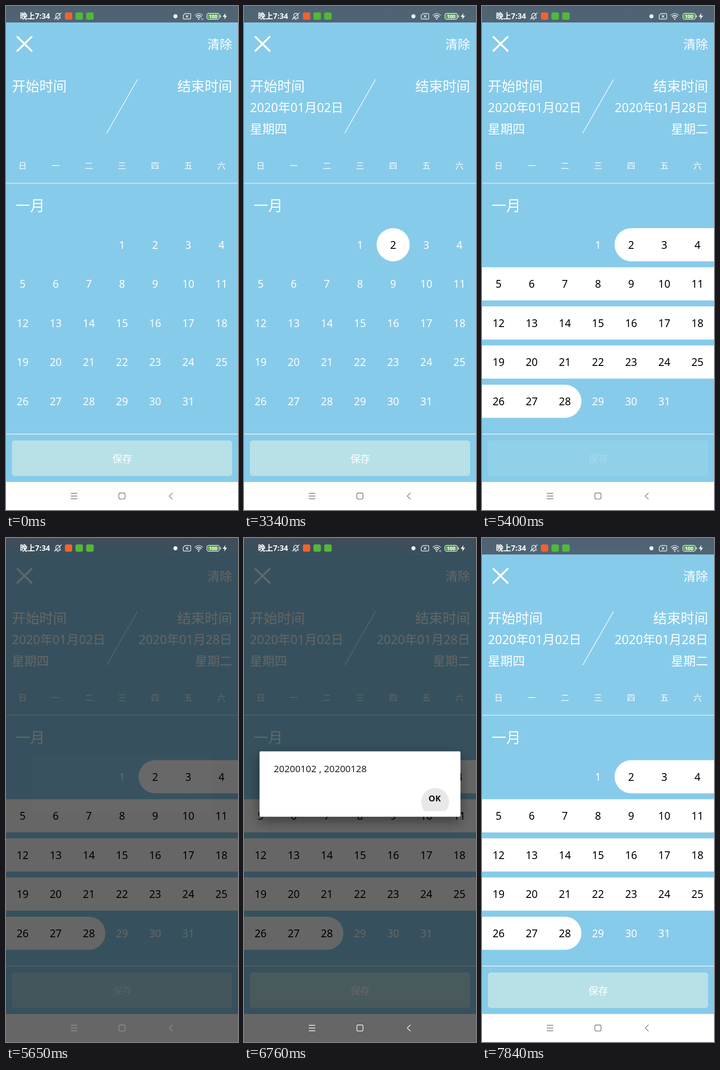
An HTML page with a canvas that plays this animation: 508 by 1102 pixels, repeating every 8 s.

```html
<!DOCTYPE html>
<html lang="zh-CN">
<head>
<meta charset="utf-8">
<title>日期选择</title>
<style>
html, body { margin: 0; width: 100%; height: 100%; overflow: hidden; background: #87cbea; }
canvas { display: block; width: 508px; height: 1102px; }
</style>
</head>
<body>
<canvas id="stage" width="508" height="1102"></canvas>
<script>
const W = 508, H = 1102, LOOP = 8000;
const SKY = '#87cbea', WHITE = '#fff';
const FONT = '"Noto Sans", "Noto Sans CJK SC", "Noto Sans CJK", sans-serif';
const CELL = W / 7, ROW = 85.55, PILL = 72.5, TOP = 485.7;
const ctx = document.getElementById('stage').getContext('2d');

const clamp = v => Math.max(0, Math.min(1, v));
const ramp = (t, a, b) => clamp((t - a) / (b - a));
const easeOut = p => 1 - (1 - p) ** 2;
const mix = (a, b, p) => a + (b - a) * p;

function text(str, x, y, size, { color = WHITE, align = 'left', weight = 400 } = {}) {
  ctx.font = `${weight} ${size}px ${FONT}`;
  ctx.textAlign = align;
  ctx.fillStyle = color;
  ctx.fillText(str, x, y);
}

function box(x, y, w, h, r, color) {
  ctx.beginPath();
  ctx.roundRect(x, y, w, h, r);
  ctx.fillStyle = color;
  ctx.fill();
}

function disc(x, y, r, color) {
  ctx.beginPath();
  ctx.arc(x, y, r, 0, Math.PI * 2);
  ctx.fillStyle = color;
  ctx.fill();
}

function stroke(path, width, color = WHITE, cap = 'butt') {
  ctx.lineWidth = width;
  ctx.strokeStyle = color;
  ctx.lineCap = cap;
  ctx.lineJoin = 'round';
  ctx.stroke(new Path2D(path));
}

function drawHeader(start, end) {
  stroke('M25 67.5L56 98M56 67.5L25 98', 4, WHITE, 'round');
  text('清除', 495, 93.5, 27, { align: 'right' });
  text('开始时间', 13, 186, 30);
  text('结束时间', 495, 186, 30, { align: 'right' });
  stroke('M288 160.5L220.5 278', 1.5);
  if (start) {
    text('2020年01月02日', 13, 232, 27);
    text('星期四', 13, 279, 27);
  }
  if (end) {
    text('2020年01月28日', 495, 232, 27, { align: 'right' });
    text('星期二', 495, 279, 27, { align: 'right' });
  }
  [...'日一二三四五六'].forEach((d, i) =>
    text(d, CELL * (i + 0.5), 356, 18, { align: 'center' }));
  box(0, 386.8, W, 1.4, 0, '#ece9e6');
}

function drawMonth(first, last) {
  text('一月', 21, 448, 32);
  const offset = 2;
  for (let r = 0; r < 5 && first; r++) {
    const a = Math.max(first + offset, r * 7), b = Math.min(last + offset, r * 7 + 6);
    if (a > b) continue;
    const left = a === first + offset ? (a % 7) * CELL : -40;
    const right = b === last + offset ? (b % 7 + 1) * CELL : W + 40;
    box(left, TOP + r * ROW, right - left, PILL, PILL / 2, WHITE);
  }
  for (let d = 1; d <= 31; d++) {
    const i = d + offset, on = d >= first && d <= last;
    text(d, (i % 7 + 0.5) * CELL, 530.5 + Math.floor(i / 7) * ROW, 23,
      { align: 'center', color: on ? '#000' : WHITE });
  }
}

function drawFooter(opacity) {
  box(0, 935.3, W, 1.5, 0, '#f2f5f5');
  ctx.globalAlpha = opacity;
  box(13, 950, 482, 77.5, 6, '#b8e1e7');
  text('保存', 254.5, 998, 21.6, { align: 'center' });
  ctx.globalAlpha = 1;
  box(0, 1040.5, W, H - 1040.5, 0, WHITE);
  box(0, 1040, W, 1, 0, '#c4ccd0');
}

function drawNav(light) {
  const v = Math.round(mix(112, 255, light));
  const c = `rgb(${v},${v},${v})`;
  stroke('M142 1065.5H156M142 1071.5H156M142 1077.5H156', 1.4, c);
  ctx.beginPath();
  ctx.roundRect(247.2, 1064.7, 13.4, 13.4, 3);
  ctx.stroke();
  stroke('M364.5 1064.5L357.5 1071.5L364.5 1078.5', 1.4, c);
}

function drawStatus(dim, traffic) {
  const shade = (a, b) => `rgb(${a.map((v, i) => Math.round(mix(v, b[i], dim))).join()})`;
  const g = ctx.createLinearGradient(0, 0, 0, 36);
  g.addColorStop(0, shade([79, 98, 113], [65, 77, 89]));
  g.addColorStop(1, shade([79, 101, 117], [57, 80, 94]));
  box(0, 0, W, 36, 0, g);
  text('晚上7:34', 30.5, 28, 16.5, { weight: 700 });

  // muted bell
  stroke('M107.5 26.5H119.5M109 26.5V20.5Q109 16 113.5 16T118 20.5V26.5M112 29.3H115', 1.4, '#f0f2f4', 'round');
  stroke('M106 29L121 15', 1.4, '#f0f2f4', 'round');

  box(129, 14, 16, 16, 4, '#f2622e');
  box(152, 14, 16.5, 16, 4, '#52b83a');
  box(175.5, 14, 16.5, 16, 4, '#52b83a');
  disc(371, 22.5, 4.5, '#f0f2f4');

  // missing card
  stroke('M392 16.5H402.5Q404.5 16.5 404.5 18.5V26.5Q404.5 28.5 402.5 28.5H390Q388 28.5 388 26.5V20.5Z', 1.4, '#f0f2f4');
  stroke('M393.8 20L399 25.2M399 20L393.8 25.2', 1.4, '#f0f2f4');

  // wireless fan
  stroke('M413 20.5Q422 12.5 431 20.5', 1.8, '#a9b3bb');
  stroke('M415.8 23.3Q422 17.7 428.2 23.3', 1.8, '#f0f2f4');
  stroke('M418.5 26Q422 22.8 425.5 26', 1.8, '#f0f2f4');
  disc(422, 28.5, 1.5, '#f0f2f4');
  if (traffic) stroke('M428.3 26.5V30.5M430.8 26.5V30.5', 1, '#e4e8eb');

  // battery
  ctx.beginPath();
  ctx.roundRect(439.8, 16.2, 27.6, 12.8, 4);
  ctx.lineWidth = 1.4;
  ctx.strokeStyle = '#f0f2f4';
  ctx.stroke();
  box(441.8, 18.2, 23.6, 8.8, 2.5, '#58b93c');
  text('100', 453.6, 26.6, 10.5, { align: 'center', weight: 700 });
  box(468.7, 20, 1.7, 5, 1, '#f0f2f4');
  ctx.fillStyle = WHITE;
  ctx.fill(new Path2D('M480.5 15.5L474.5 23.5H478.8L477.8 29.5L484 21.2H479.6Z'));
}

function drawDialog(alpha, scale, t) {
  if (alpha <= 0) return;
  ctx.save();
  ctx.globalAlpha = alpha;
  ctx.translate(254, 538);
  ctx.scale(scale, scale);
  ctx.translate(-254, -538);
  ctx.save();
  ctx.shadowColor = 'rgba(0,0,0,.42)';
  ctx.shadowBlur = 28;
  ctx.shadowOffsetY = 10;
  box(34, 466.5, 440, 143, 3, WHITE);
  ctx.restore();
  text('20200102 , 20200128', 65, 512, 20.5, { color: '#222' });
  if (t >= 6560) {
    ctx.save();
    ctx.beginPath();
    ctx.rect(376, 545, 84, 52);
    ctx.clip();
    ctx.globalAlpha = alpha * ramp(t, 6520, 6640);
    disc(418.5, 577, mix(20, 30.5, ramp(t, 6560, 6760)) + 5 * ramp(t, 6760, 6900), '#e8e8e8');
    ctx.restore();
  }
  text('OK', 417.5, 576, 18.5, { color: '#111', align: 'center', weight: 600 });
  ctx.restore();
}

function draw(t) {
  const start = t >= 2310, end = t >= 3590;
  const dim = t < 5650 ? 0 : 1 - ramp(t, 6790, 7000);
  const shown = easeOut(ramp(t, 5650, 5850));
  const alpha = shown * (1 - ramp(t, 6790, 6930));
  const press = t < 5650
    ? mix(1, 0.2, ramp(t, 5210, 5400))
    : mix(0.62, 1, ramp(t, 5650, 5810));

  box(0, 0, W, H, 0, SKY);
  drawHeader(start, end);
  drawMonth(start ? 2 : 0, end ? 28 : start ? 2 : 0);
  drawFooter(press);
  if (dim) box(0, 0, W, H, 0, `rgba(0,0,0,${0.6 * dim})`);
  drawStatus(dim, t < 3340 || t >= 6310);
  drawNav(t < 5650 ? 0 : mix(0.25, 1, ramp(t, 5650, 5850)) * dim);
  drawDialog(alpha, mix(0.9, 1, shown), t);
}

const origin = performance.now();
function tick() {
  draw((performance.now() - origin) % LOOP);
  requestAnimationFrame(tick);
}
tick();
</script>
</body>
</html>
```
